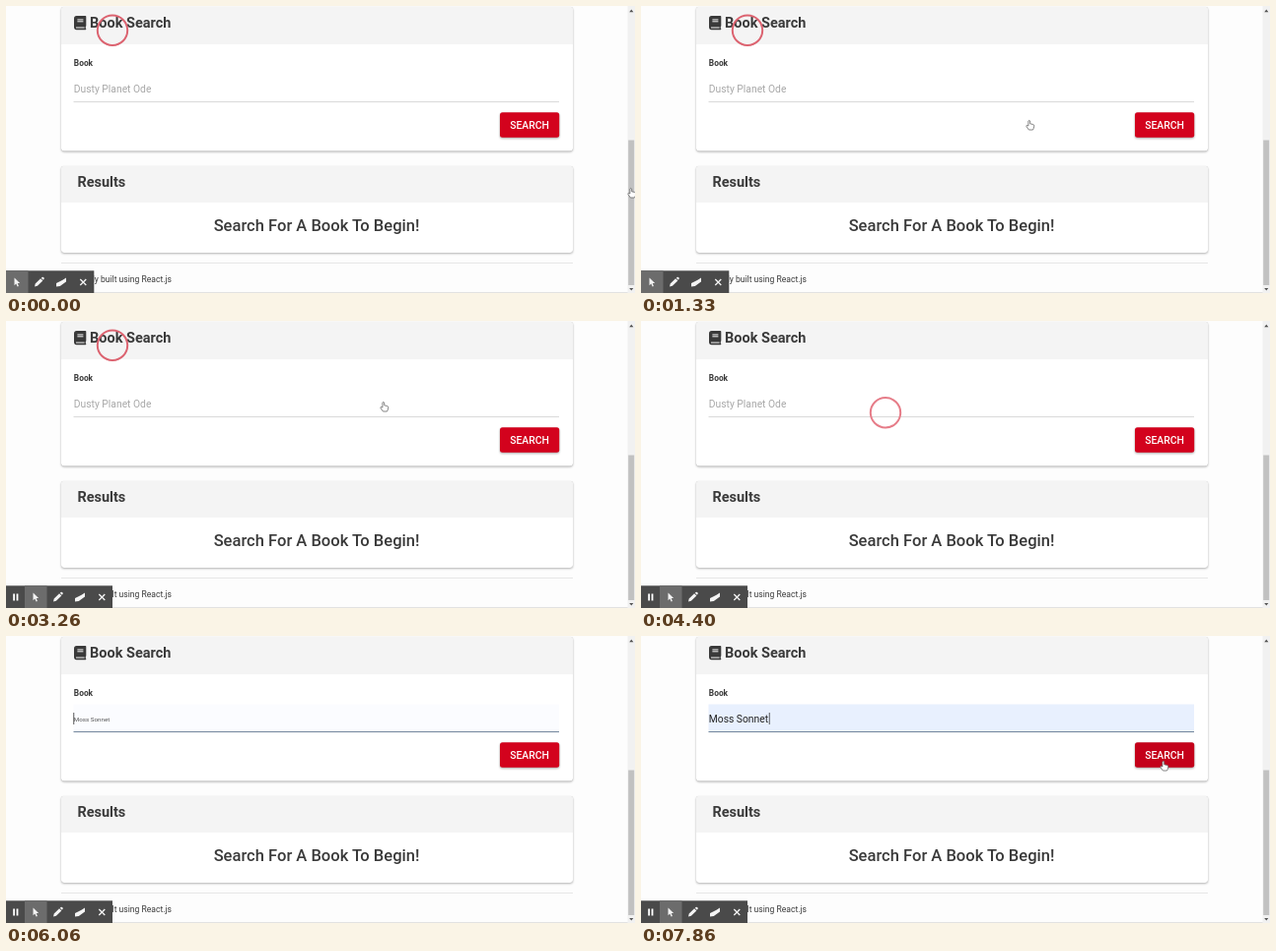
Write an HTML page that moves like this. It is 638 px wide and 292 px high and loops after 8 s.

```html
<!DOCTYPE html>
<html lang="en">
<head>
<meta charset="utf-8">
<title>Book Search</title>
<style>
  html, body { margin: 0; width: 100%; height: 100%; overflow: hidden; background: #fdfdfd; }
  svg { display: block; width: 638px; height: 292px; }
  text { font-family: Roboto, sans-serif; fill: #3a3a3a; white-space: pre; }
  .title { font-size: 14.5px; font-weight: 700; }
  .label { font-size: 8.4px; font-weight: 700; }
  .field { font-size: 10.3px; }
  .card { filter: drop-shadow(0 1px 1px rgba(0, 0, 0, .24)) drop-shadow(0 0 .6px rgba(0, 0, 0, .3)); }
  .button { filter: drop-shadow(0 1px 1px rgba(0, 0, 0, .35)); }
  .pointer { fill: #fff; stroke: #666; stroke-width: .8; stroke-linejoin: round; }
</style>
</head>
<body>
<svg viewBox="0 0 638 292">
  <defs>
    <path id="pen" d="M-4.5 4.5 l.7 -2.9 5.4 -5.4 2.2 2.2 -5.4 5.4z M2.3 -4.3 l1 -.9 q.6 -.3 1.1 .1 l.7 .7 q.4 .5 0 1.1 l-.8 1z"/>
    <path id="eraser" d="M-5 1 L1.5 -2.2 L5 -4.4 V-.4 L-1.2 3.9 L-5 4.6z"/>
    <path id="close" d="M-3 -3 L3 3 M3 -3 L-3 3" stroke="#f4f4f4" stroke-width="1.3"/>
    <path id="select" d="M-2.5 -4.4 V3.2 L-.7 1.6 L.6 4.5 L1.9 3.9 L.7 1.1 H3.1z"/>
    <g id="tools" fill="#f4f4f4">
      <rect x="-11" y="-12" width="22.5" height="23" fill="#6c6c6c"/>
      <use href="#select"/>
      <use href="#pen" x="22.5"/>
      <use href="#eraser" x="45"/>
      <use href="#close" x="67.3"/>
    </g>
  </defs>

  <rect width="638" height="292" fill="#fdfdfd"/>

  <g class="card">
    <rect x="56" y="1" width="519" height="146.5" rx="3" fill="#fff"/>
    <path d="M56 39 V4 q0 -3 3 -3 H572 q3 0 3 3 V39z" fill="#f4f4f4"/>
  </g>
  <g class="card">
    <rect x="56" y="163" width="519" height="88" rx="3" fill="#fff"/>
    <path d="M56 200 V166 q0 -3 3 -3 H572 q3 0 3 3 V200z" fill="#f4f4f4"/>
  </g>

  <g fill="#3a3a3a">
    <path d="M71.6 10 H80.6 q.7 0 .7 .7 V20 q0 .6 -.5 .9 v1.9 q.5 .3 .5 .8 t-.7 .6 H71.6 q-2.6 -.2 -2.6 -2.7 V12.7 q0 -2.5 2.6 -2.7z"/>
    <path d="M72.4 13.9 H78.4 M72.4 15.8 H78.4 M71 22 H79.6" stroke="#f4f4f4" stroke-width="1"/>
  </g>
  <text class="title" x="85" y="22.3">Book Search</text>
  <text class="label" x="68.8" y="60.9">Book</text>

  <rect id="fill" x="68.5" y="69.5" width="492.5" height="28"/>
  <text id="entry" x="68.8"></text>
  <rect id="line" x="68.5" y="97" width="492.5" height="1"/>
  <rect id="caret" y="78" width=".8" height="12" fill="#333"/>

  <rect id="button" class="button" x="501" y="108.3" width="60.2" height="25.5" rx="2.5"/>
  <text x="531" y="125.2" text-anchor="middle" font-size="10.4" font-weight="500" style="fill:#fff">SEARCH</text>

  <text class="title" x="72.4" y="183.8">Results</text>
  <text x="315" y="228.6" text-anchor="middle" font-size="16.55" font-weight="500">Search For A Book To Begin!</text>

  <rect x="56" y="261" width="519" height="1" fill="#e6e6e6"/>
  <text x="168" y="280.9" text-anchor="end" font-size="8.57">Proudly built using React.js</text>
  <rect y="291" width="631" height="1" fill="#e2e2e2"/>

  <rect x="630.5" width="7.5" height="292" fill="#f1f1f1"/>
  <rect x="631.2" y="136.5" width="6" height="147.5" fill="#c1c1c1"/>
  <path d="M632.2 6.2 L634.3 3.6 L636.4 6.2z M632.2 287 L634.3 289.6 L636.4 287z" fill="#555"/>

  <circle id="ring" r="15.2" fill="none" stroke-width="2"/>

  <rect id="bar" y="269.3" height="22.7" fill="#4a4a4a"/>
  <path id="pause" d="M7.2 277.5 h1.8 v7 h-1.8z M10.6 277.5 h1.8 v7 h-1.8z" fill="#fff"/>
  <use id="icons" href="#tools" y="281"/>

  <path id="hand" class="pointer" d="M-2.1 1 V-4 q.9 -1.4 1.8 0 V-1.2 L2.8 -.5 q1.2 .4 1 1.6 L3.2 3.6 L2.5 5 H-1.6 L-4 1.6 q-.5 -1.3 .7 -1.1z"/>
  <path id="arrow" class="pointer" d="M-.6 -3.6 V3.2 L1 1.8 L2.2 4.4 L3.3 3.9 L2.2 1.4 H4.2z"/>
</svg>
<script>
  const LOOP = 8000;
  const PLACEHOLDER = "Dusty Planet Ode", TITLE = "Moss Sonnet";

  // [time, x, y]
  const PATH = [
    [0, 635, 190], [260, 635, 190], [860, 432, 146], [1060, 432, 146],
    [1330, 395, 121], [1460, 395, 121], [1660, 386, 92], [2260, 386, 92],
    [2400, 384, 87], [4330, 384, 87],
    [6930, 470, 141], [7060, 470, 141], [7200, 497, 139], [7460, 497, 139],
    [7530, 520, 134], [7800, 520, 134], [7860, 531, 132], [8000, 531, 132]
  ];

  const $ = id => document.getElementById(id);
  const set = (id, attrs) => {
    for (const k in attrs) $(id).setAttribute(k, attrs[k]);
  };
  const show = (id, on) => set(id, { visibility: on ? "visible" : "hidden" });

  function pointerAt(t) {
    const i = Math.max(1, PATH.findIndex(p => p[0] > t));
    const [t0, x0, y0] = PATH[i - 1], [t1, x1, y1] = PATH[i];
    const k = (t - t0) / (t1 - t0);
    return [x0 + (x1 - x0) * k, y0 + (y1 - y0) * k];
  }

  function drawPointer(t) {
    const [x, y] = pointerAt(t);
    const visible = t < 4330 || t >= 6930;
    const overButton = t >= 6930 && x > 501;
    const isHand = t < 4330 || overButton;
    show("hand", visible && isHand);
    show("arrow", visible && !isHand);
    set(isHand ? "hand" : "arrow", { transform: `translate(${x} ${y})` });
    set("button", { fill: overButton ? "#c4001a" : "#d3021d" });
  }

  function drawRing(t) {
    const second = t >= 4330;
    const fade = Math.min(1, Math.max(0, (5530 - t) / 200));
    set("ring", {
      cx: second ? 248 : 108, cy: second ? 93.3 : 24.8,
      stroke: second ? "#e67c88" : "#dc6370", opacity: fade
    });
  }

  function drawField(t) {
    const focused = t >= 5400, preview = t >= 6000 && t < 6930, filled = t >= 6930;
    const entry = $("entry");
    entry.textContent = preview || filled ? TITLE : PLACEHOLDER;
    entry.style.fontSize = preview ? "6.24px" : "10.3px";
    entry.style.fill = filled ? "#222" : preview ? "#555" : "#a8a8a8";
    set("entry", { y: preview ? 87.3 : 87.7 });
    set("fill", { fill: filled ? "#e8f0fe" : preview ? "#fbfcff" : "#fff" });
    set("line", { fill: focused ? "#72869c" : "#dadada" });
    set("caret", { x: filled ? 129.8 : 68.4 });
    show("caret", focused);
  }

  function drawBar(t) {
    const wide = t >= 3200;
    set("bar", { width: wide ? 108 : 89.3 });
    set("icons", { x: wide ? 30 : 11 });
    show("pause", wide);
  }

  function frame(now) {
    const t = now % LOOP;
    drawPointer(t);
    drawRing(t);
    drawField(t);
    drawBar(t);
    requestAnimationFrame(frame);
  }
  frame(performance.now());
</script>
</body>
</html>
```
